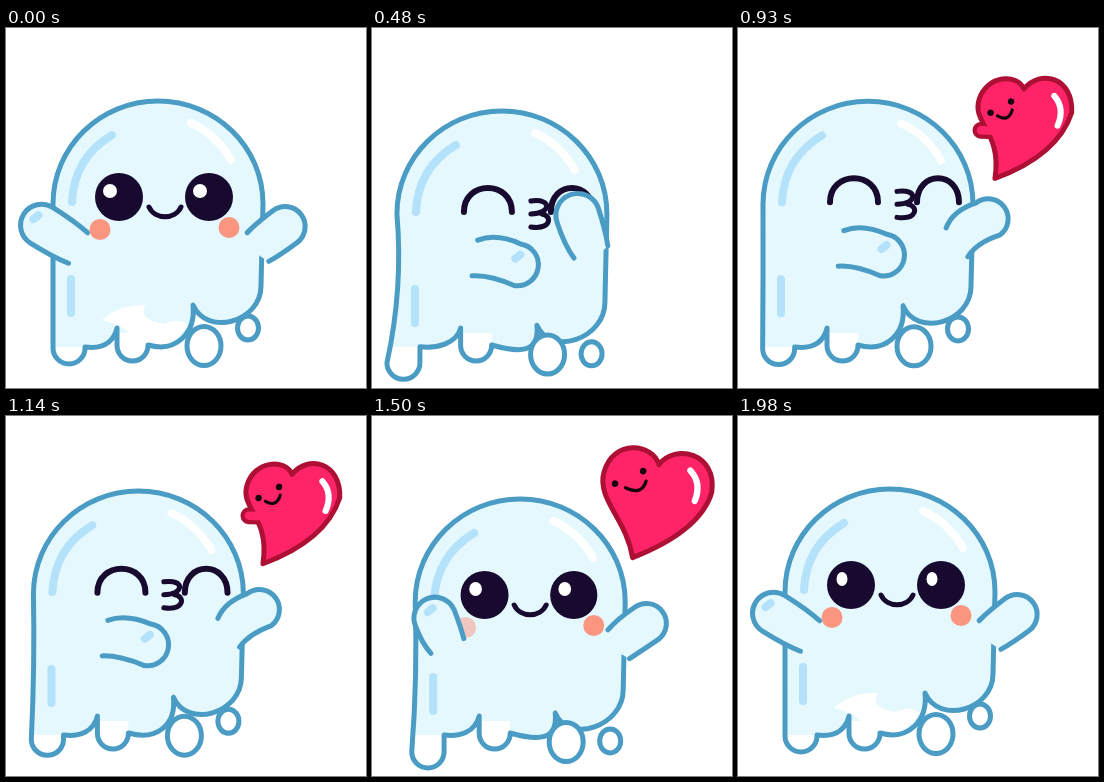
Animation of 360 by 360 pixels, one loop 2.01 s. Source, as an HTML page:

```html
<!DOCTYPE html>
<html lang="en">
<head>
<meta charset="utf-8">
<title>Ghost blowing a kiss</title>
<style>
html, body { margin: 0; width: 100%; height: 100%; overflow: hidden; background: #fff; }
svg { display: block; width: 100vw; height: 100vh; }
path { stroke-linecap: round; stroke-linejoin: round; }
.skin { fill: #e4f8fe; }
.edge { fill: none; stroke: #4a9cc4; stroke-width: 5; }
.drop { fill: #fff; stroke: #4a9cc4; stroke-width: 5; }
.white { fill: #fff; }
.shine { fill: none; stroke: #b4e2fb; stroke-width: 8; }
.glint { fill: none; stroke: #fff; stroke-width: 8; }
.ink { fill: #170a2e; }
.line { fill: none; stroke: #170a2e; stroke-width: 6; }
.thin { stroke-width: 5; }
.blush { fill: #fa957f; }
.heart { fill: #ff2468; stroke: #ad1034; stroke-width: 5; vector-effect: non-scaling-stroke; }
.rim { fill: none; stroke: #ad1034; stroke-width: 18; }
.stub { fill: none; stroke: #ff2468; stroke-width: 9; }
.gleam { fill: none; stroke: #fff; stroke-width: 6.5; }
.dark { fill: #16050f; }
.grin { fill: none; stroke: #16050f; stroke-width: 3.4; }
</style>
</head>
<body>
<svg id="stage" viewBox="0 0 360 360"></svg>
<script>
const LOOP = 2010, STEP = 30, CYCLE = 1980;
const svgNS = 'http://www.w3.org/2000/svg';

function ramp(t, a, b) {
  const u = Math.min(1, Math.max(0, (t - a) / (b - a)));
  return u * u * (3 - 2 * u);
}
// Eases 0 to 1 over a..b and back to 0 over c..d.
const swell = (t, a, b, c, d) => ramp(t, a, b) - ramp(t, c, d);

function add(parent, tag, cls = '', d = '') {
  const el = document.createElementNS(svgNS, tag);
  el.setAttribute('class', cls);
  if (d) el.setAttribute('d', d);
  return parent.appendChild(el);
}
function set(el, attrs) {
  for (const k in attrs) el.setAttribute(k, attrs[k]);
}
const oval = (el, cx, cy, rx, ry = rx) => set(el, { cx, cy, rx, ry });
const show = (el, amount) => set(el, { opacity: +amount });
const move = (el, x, y, more = '') => set(el, { transform: `translate(${x} ${y}) ${more}` });
const pair = make => [make(), make()];

const stage = document.getElementById('stage');
// The ghost's own origin is the top of its head.
const ghost = add(stage, 'g');
const skin = add(ghost, 'path', 'skin');
const patch = add(ghost, 'path', 'white', 'M-56,219Q-39,203 -12,204Q-22,218 6,223Q20,216 30,224Q14,248 -10,246L-38,225Z');
const feet = add(ghost, 'path', 'white');
const edge = add(ghost, 'path', 'edge');
add(ghost, 'path', 'shine', 'M-86,101Q-84,57 -46,34M-87,178V212');
add(ghost, 'path', 'glint', 'M33,22Q58,33 73,59');
const drops = pair(() => add(ghost, 'ellipse', 'drop'));
const cheeks = pair(() => add(ghost, 'ellipse', 'blush'));
const eyes = pair(() => ({
  ball: add(ghost, 'ellipse', 'ink'),
  spark: add(ghost, 'ellipse', 'white'),
  lid: add(ghost, 'path', 'line')
}));
const smile = add(ghost, 'path', 'line thin', 'M-16,-4C-10,9 10,9 16,-4');
const kiss = add(ghost, 'path', 'line thin', 'M-9,-13C13,-16 11,0 -9,0M2,0C13,2 11,16 -9,13');

const heart = add(stage, 'g');
const stubRim = add(heart, 'path', 'rim', 'M0,0l14,-4');
const heartShape = add(heart, 'path', 'heart');
const stub = add(heart, 'path', 'stub', 'M0,0l14,-4');
add(heart, 'path', 'gleam', 'M33,-3Q48,6 46,26');
const heartEyes = pair(() => add(heart, 'ellipse', 'dark'));
const grin = add(heart, 'path', 'grin');

const arms = add(stage, 'g');
const [leftArm, rightArm] = pair(() => ({
  fill: add(arms, 'path', 'skin'),
  edge: add(arms, 'path', 'edge')
}));
const handShine = add(arms, 'path', 'shine', 'M-8,-6l5,-4');

// All shared motion of the ghost at time t.
function poseAt(t) {
  const bob = (1 - Math.cos(4 * Math.PI * t / CYCLE)) / 2;
  const push = Math.exp(-(((t - 640) / 90) ** 2));
  const lean = swell(t, 0, 480, 1000, 1680);
  return {
    bob, push,
    x: 152 - 22 * lean - 2 * push,
    y: 73 + 10 * bob,
    drag: bob * Math.min(1, 2 * lean),
    turn: swell(t, 0, 250, 1000, 1650),
    reach: swell(t, 0, 400, 1150, 1650),
    touch: swell(t, 20, 230, 430, 700),
    shut: swell(t, 100, 190, 1120, 1220)
  };
}

function foot(right, left, bottom) {
  const r = (right - left) / 2, y = bottom - r;
  return `L${right},${y}A${r},${r} 0 0 1 ${left},${y}`;
}

function drawBody(t, { y, bob, push, drag }) {
  const hem = 258 + 16 * bob + 13 * push - y;
  const cusp = 277 + 20 * bob + 9 * push - y;
  const mid = 317 - y, notch = 300 - y, low = 319 - 4 * push - y;
  const bottom = 336 + 16 * bob - 15 * push - y;
  const slip = -7 * push;
  const a = -10 + slip, b = -41 + slip, c = -73 - 9 * drag, d = -105 - 10 * drag;
  const foot2 = foot(a, b, 333 - y), foot1 = foot(c, d, bottom);
  const bend = 12 * drag - 14 * push;
  const outline = `M-105,103C-105,46 -58,0 0,0S105,46 105,103L103,${hem}` +
    `C103,${hem + 36} 49,${cusp + 32} 35,${cusp}` +
    `C38,${cusp + 28} ${a + 28},${mid + 8} ${a},${mid}${foot2}L${b},${notch}` +
    `C${b - 4},${notch + 16} ${c + 16},${low + 2} ${c},${low}${foot1}` +
    `Q${(d - 105) / 2 + bend},${bottom / 2 + 43} -105,103Z`;
  set(skin, { d: outline });
  set(edge, { d: outline });
  set(feet, { d: `M${a},${notch + 5}V${mid}${foot2}V${notch + 5}ZM${c},${low}${foot1}V${low}Z` });
  show(patch, 1 - swell(t, 20, 100, 1880, 1970));
  oval(drops[0], 46 - 8 * push, 318 + 8 * bob + 11 * push - y, 17, 19.5);
  oval(drops[1], 90 - 8 * push, 300 + 25 * bob + 20 * push - y, 10.5, 12);
}

function drawFace(t, { turn, shut }) {
  const y = 96 - 7 * shut;
  const open = 1 - shut, isOpen = open > .3;
  const xs = [-39 + 25 * turn, 51 + 19 * turn], widths = [24, 24 - 3 * turn];
  const slim = ramp(t, 1320, 1710);
  eyes.forEach(({ ball, spark, lid }, i) => {
    const x = xs[i], w = widths[i];
    oval(ball, x, y, w, 24 * open);
    oval(spark, x - 9, y - 6 * open, 7 - 1.5 * slim, 7 * open);
    set(lid, { d: `M${x - w},${y + 12}C${x - w},${y - 20} ${x + w},${y - 20} ${x + w},${y + 12}` });
    show(ball, isOpen);
    show(spark, isOpen);
    show(lid, !isOpen);
  });
  for (const el of [smile, kiss]) move(el, (xs[0] + xs[1]) / 2 + 1 + 9 * shut, y + 14);
  show(smile, isOpen);
  show(kiss, !isOpen);
  oval(cheeks[0], xs[0] - 19, y + 32.5, 10.5);
  oval(cheeks[1], xs[1] + 20, y + 30.5, 10.5);
  show(cheeks[0], 1 - swell(t, 60, 150, 1450, 1550));
  show(cheeks[1], 1 - swell(t, 60, 150, 1150, 1250));
}

// An open pill from the shoulder towards the hand; bend lifts the forearm.
function drawArm(arm, x, y, degrees, length, r, bend) {
  const turn = degrees * Math.PI / 180;
  const dx = Math.cos(turn), dy = Math.sin(turn);
  const hand = { x: x + dx * length, y: y + dy * length };
  const at = (along, side) => `${x + dx * along - dy * side},${y + dy * along + dx * side}`;
  const elbow = length * .4;
  const d = `M${at(0, 18)}Q${at(elbow, r - bend)} ${at(length, r)}` +
    `A${r},${r} 0 0 0 ${at(length, -r)}Q${at(elbow, -r - bend)} ${at(0, -18)}`;
  set(arm.edge, { d });
  set(arm.fill, { d: `${d}Q${at(-10, 0)} ${at(0, 18)}Z` });
  return hand;
}

function drawArms({ x, y, turn, reach, touch }) {
  const fold = Math.sin(Math.PI * reach);
  const hand = drawArm(leftArm, x - 80 + 53 * turn, y + 147, -148 + 157 * reach, 43 - 20 * fold, 21, 7 * turn);
  move(handShine, hand.x + 6 * turn, hand.y);
  drawArm(rightArm, x + 100 - 11 * turn, y + 146 - 5 * turn, -37 - 80 * touch, 34 + 5 * turn, 20 + 2 * touch, 8 * turn * (1 - touch));
}

// The heart's own origin is the notch; curl 1 bends its tail like a small ghost.
function drawHeart(t) {
  const fly = ramp(t, 640, 930), curl = 1 - ramp(t, 1330, 1700), flat = 1 - curl;
  const left = 66 - 24 * curl, right = 66 - 10 * curl;
  set(heartShape, {
    d: `M0,0C-12,${-26 + 12 * curl} ${-left},${-28 + 26 * curl} ${-left},${20 + 5 * curl}` +
      `C${-left},52 ${-28 + 20 * curl},${80 - 30 * curl} 0,100` +
      `C${28 + 10 * curl},${80 - 10 * curl} ${right},${52 - 14 * curl} ${right},${18 - 10 * curl}` +
      `C${right - 10 * curl},-28 10,-26 0,0Z`
  });

  const face = (x, y) => [-17 - 19 * flat + x * (1 + flat), 27 - 11 * flat + y * (1 + .3 * flat)];
  oval(heartEyes[0], ...face(-9, 8), 3.4);
  oval(heartEyes[1], ...face(8, -10), 3.4);
  set(grin, { d: `M${face(-1, 9)}Q${face(12, 12)} ${face(12, -2)}` });
  for (const el of [stubRim, stub]) move(el, -30 * fly * curl, 56);

  const rise = 15 * ramp(t, 930, 1710) + 19 * ramp(t, 1700, 1830);
  const size = (.48 + .46 * fly + .06 * flat) * swell(t, 530, 650, 1820, 1925);
  const tilt = 78 - 60 * fly - 5 * flat;
  move(heart, 250 + 36 * fly + 2 * flat, 166 - 105 * fly - rise, `rotate(${tilt}) scale(${size})`);
  show(heart, t >= 570 && t < 1920);
}

function render(now) {
  const t = Math.min(CYCLE, Math.floor(now % LOOP / STEP) * STEP);
  const pose = poseAt(t);
  move(ghost, pose.x, pose.y);
  drawBody(t, pose);
  drawFace(t, pose);
  drawArms(pose);
  drawHeart(t);
}

const start = performance.now();
function tick() {
  render(performance.now() - start);
  requestAnimationFrame(tick);
}
tick();
</script>
</body>
</html>
```
